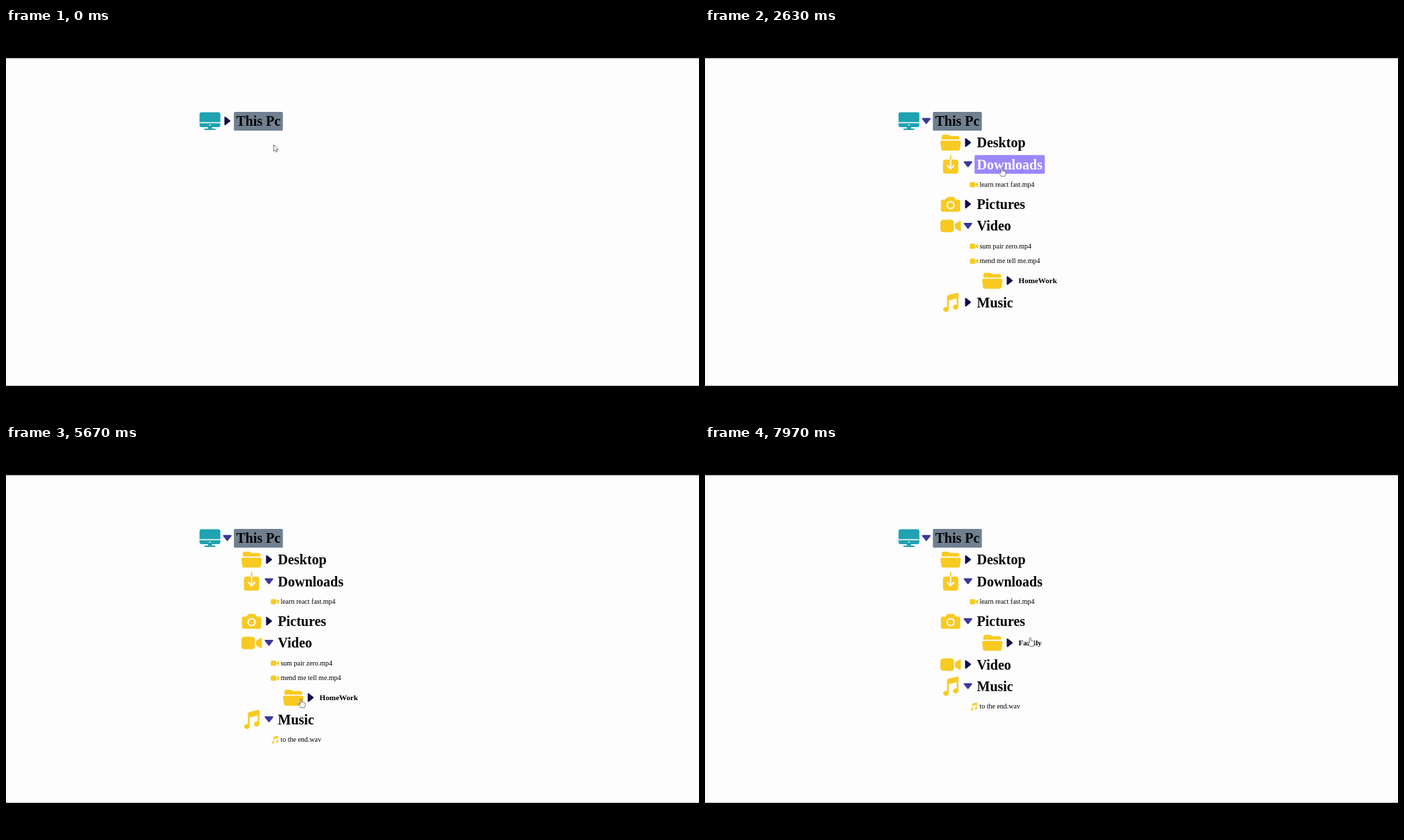
Write an HTML page with a canvas that moves like this. It is 998x561 px and loops after 8000 ms.

```html
<!DOCTYPE html>
<html lang="en">
<head>
<meta charset="utf-8">
<title>Folder tree</title>
<style>
  html, body { margin: 0; width: 100%; height: 100%; overflow: hidden; background: #000; }
  canvas { display: block; }
</style>
</head>
<body>
<canvas id="stage" width="998" height="561"></canvas>
<script>
const ctx = document.getElementById('stage').getContext('2d');
const LOOP = 8000;
const PAPER = '#fdfdfd', TEAL = '#1fa2b1', YELLOW = '#f8ca22';

// Icons are centred on 0,0: a solid shape, then strokes cut out in the paper colour.
const icon = (solid, cut = '', color = YELLOW) =>
  ({ solid: new Path2D(solid), cut: new Path2D(cut), color });

const ICONS = {
  monitor: icon(
    'M-12 -13H12Q15 -13 15 -10V5.5Q15 8.5 12 8.5H3V10.5H7Q8.2 10.5 8.2 11.6T7 12.7H-7Q-8.2 12.7 -8.2 11.6T-7 10.5H-3V8.5H-12Q-15 8.5 -15 5.5V-10Q-15 -13 -12 -13Z',
    'M-15 2.1H15M-.7 5.5H.7', TEAL),
  folder: icon(
    'M-12.8 -4.8V-8.8Q-12.8 -11.8 -9.8 -11.8H-4.5Q-3 -11.8 -1.8 -10.8T1 -9.9H9.8Q12.8 -9.9 12.8 -6.9V-4.8Z' +
    'M-12 -3.2H12Q15 -3.2 14.7 -.2L13.5 8.3Q13 11.2 10.5 11.2H-10.5Q-13 11.2 -13.5 8.3L-14.7 -.2Q-15 -3.2 -12 -3.2Z'),
  download: icon(
    'M-1 -7V-13Q0 -14.6 1 -13V-7H7.5Q11 -7 11 -3.5V9.7Q11 13.2 7.5 13.2H-7.5Q-11 13.2 -11 9.7V-3.5Q-11 -7 -7.5 -7Z',
    'M0 -6.5V6M-4.7 1.5L0 6.2L4.7 1.5'),
  camera: icon(
    'M-11 -7H-8.5Q-7 -7 -6 -9T-3.5 -11H3.5Q5 -11 6 -9T8.5 -7H11Q14 -7 14 -4V7.5Q14 10.5 11 10.5H-11Q-14 10.5 -14 7.5V-4Q-14 -7 -11 -7Z',
    'M5 1A5 5 0 1 1 -5 1A5 5 0 1 1 5 1Z'),
  video: icon(
    'M-10.2 -9H.3Q4.8 -9 4.8 -4.5V4.5Q4.8 9 .3 9H-10.2Q-14.7 9 -14.7 4.5V-4.5Q-14.7 -9 -10.2 -9Z' +
    'M6.3 -3.2L12.8 -7.2Q14.8 -8 14.8 -6V6Q14.8 8 12.8 7.2L6.3 3.2Z'),
  music: icon(
    'M-5.2 -8.7Q-5.2 -10.2 -3.7 -10.7L9.2 -14Q11.2 -14.4 11.2 -12.6V6.2A4 3.6 0 1 1 8.8 3.3V-6L-2.8 -3V9.4A4 3.7 0 1 1 -5.2 6.7Z')
};

const folder = (name, iconName, toggles = [], children = []) => ({ name, icon: iconName, toggles, children });
const file = (name, iconName) => ({ name, icon: iconName, isFile: true });

const tree = folder('This Pc', 'monitor', [500], [
  folder('Desktop', 'folder'),
  folder('Downloads', 'download', [2250], [file('learn react fast.mp4', 'video')]),
  folder('Pictures', 'camera', [7670], [folder('Family', 'folder')]),
  folder('Video', 'video', [1300, 6500], [
    file('sum pair zero.mp4', 'video'),
    file('mend me tell me.mp4', 'video'),
    folder('HomeWork', 'folder')
  ]),
  folder('Music', 'music', [4750], [file('to the end.wav', 'music')])
]);

// Pointer stops: time, x, y
const POINTER = [
  [0, 385.5, 168.5], [120, 385, 167], [380, 373, 138], [620, 373, 138],
  [1030, 427, 244], [1180, 426, 256], [1600, 426, 257], [2050, 427, 201],
  [3250, 427.5, 201], [3750, 445, 258], [3970, 445.5, 262], [4150, 444, 268],
  [4600, 425, 394], [5100, 425, 395], [5670, 425, 366], [5800, 424, 360],
  [6270, 416, 278], [6800, 416, 279], [7300, 440, 252], [7700, 443, 253], [8000, 469, 278]
];

function pointerAt(t) {
  const next = Math.max(1, POINTER.findIndex(stop => stop[0] >= t));
  const [t0, x0, y0] = POINTER[next - 1], [t1, x1, y1] = POINTER[next];
  const u = (t - t0) / (t1 - t0), k = u * u * (3 - 2 * u);
  return { x: x0 + (x1 - x0) * k, y: y0 + (y1 - y0) * k };
}

const isOpen = (node, t) => node.toggles.filter(at => t >= at).length % 2 === 1;

// Flattens the visible tree into rows; spacing depends on the kinds of neighbouring rows.
function layout(t) {
  const rows = [];
  let y = 134.4;
  (function visit(node, depth) {
    const last = rows[rows.length - 1];
    if (last) {
      const files = !!last.node.isFile + !!node.isFile;
      y += [31.2, 28.8, 21.5][files];
    }
    rows.push({ node, depth, y });
    if (!node.isFile && isOpen(node, t)) node.children.forEach(child => visit(child, depth + 1));
  })(tree, 0);
  return rows;
}

function drawIcon({ solid, cut, color }, x, y, scale = 1) {
  ctx.save();
  ctx.translate(x, y);
  ctx.scale(scale, scale);
  ctx.fillStyle = color;
  ctx.fill(solid);
  ctx.strokeStyle = PAPER;
  ctx.lineWidth = color === TEAL ? 1.4 : 2;
  ctx.lineCap = ctx.lineJoin = 'round';
  ctx.stroke(cut);
  ctx.restore();
}

const CARET = new Path2D('M-3.2 -5.2L3.4 0L-3.2 5.2Z');

function drawCaret(x, y, open) {
  ctx.save();
  ctx.translate(x, y - 0.4);
  if (open) ctx.rotate(Math.PI / 2);
  ctx.fillStyle = ctx.strokeStyle = open ? '#3b3899' : '#100d45';
  ctx.lineWidth = 2;
  ctx.lineJoin = 'round';
  ctx.fill(CARET);
  ctx.stroke(CARET);
  ctx.restore();
}

function drawText(text, x, y, size, bold, color = '#000') {
  ctx.font = `${bold ? 'bold ' : ''}${size}px "Liberation Serif", serif`;
  ctx.fillStyle = color;
  ctx.fillText(text, x, y + size * 0.34);
}

function drawRow({ node, depth, y }, t, pointer) {
  if (node.isFile) {
    drawIcon(ICONS[node.icon], 387.3, y + 0.4, 0.41);
    drawText(node.name, 395.4, y, 10, false);
    return;
  }
  const left = 293.7 + depth * 60, textX = left + 37.8;
  const size = depth < 2 ? 20 : 11.1, half = depth < 2 ? 13.5 : 8;
  drawIcon(ICONS[node.icon], left, y);
  drawCaret(left + 25, y, isOpen(node, t));

  ctx.font = `bold ${size}px "Liberation Serif", serif`;
  const boxX = textX - 3.3, boxWidth = ctx.measureText(node.name).width + 6.6;
  const hovered = depth > 0 && Math.abs(pointer.y - y) < half &&
    pointer.x > boxX && pointer.x < boxX + boxWidth;
  if (hovered || depth === 0) {
    ctx.fillStyle = hovered ? '#9a87fc' : '#708090';
    ctx.beginPath();
    ctx.roundRect(boxX, y - half, boxWidth, half * 2, 1.5);
    ctx.fill();
  }
  drawText(node.name, textX, y, size, true, hovered ? '#fff' : '#000');
}

const ARROW = new Path2D('M0 0V9.3L2.2 7.3L3.7 10.6L5.1 10L3.7 6.8H6.6Z');
const HAND = new Path2D('M-1 1Q0 -.5 1 1V5Q2.2 4.2 2.8 5.3Q4 4.6 4.5 5.8Q6 5.3 6 7V9.5Q6 11 4.8 12.8H-.8Q-2 10.5 -3.8 8.5Q-4.3 7 -2.8 7L-1 8.3Z');

function drawPointer({ x, y }, rows) {
  const overTree = y > 118 && y < rows[rows.length - 1].y + 16;
  const shape = overTree ? HAND : ARROW;
  ctx.save();
  ctx.translate(x, y);
  ctx.fillStyle = '#fff';
  ctx.strokeStyle = '#55555f';
  ctx.lineWidth = 0.8;
  ctx.lineJoin = 'round';
  ctx.fill(shape);
  ctx.stroke(shape);
  ctx.restore();
}

function draw(t) {
  ctx.fillStyle = '#000';
  ctx.fillRect(0, 0, 998, 561);
  ctx.fillStyle = PAPER;
  ctx.fillRect(0, 43.5, 998, 472.5);
  const rows = layout(t), pointer = pointerAt(t);
  rows.forEach(row => drawRow(row, t, pointer));
  drawPointer(pointer, rows);
}

function tick() {
  draw(performance.now() % LOOP);
  requestAnimationFrame(tick);
}
tick();
</script>
</body>
</html>
```
